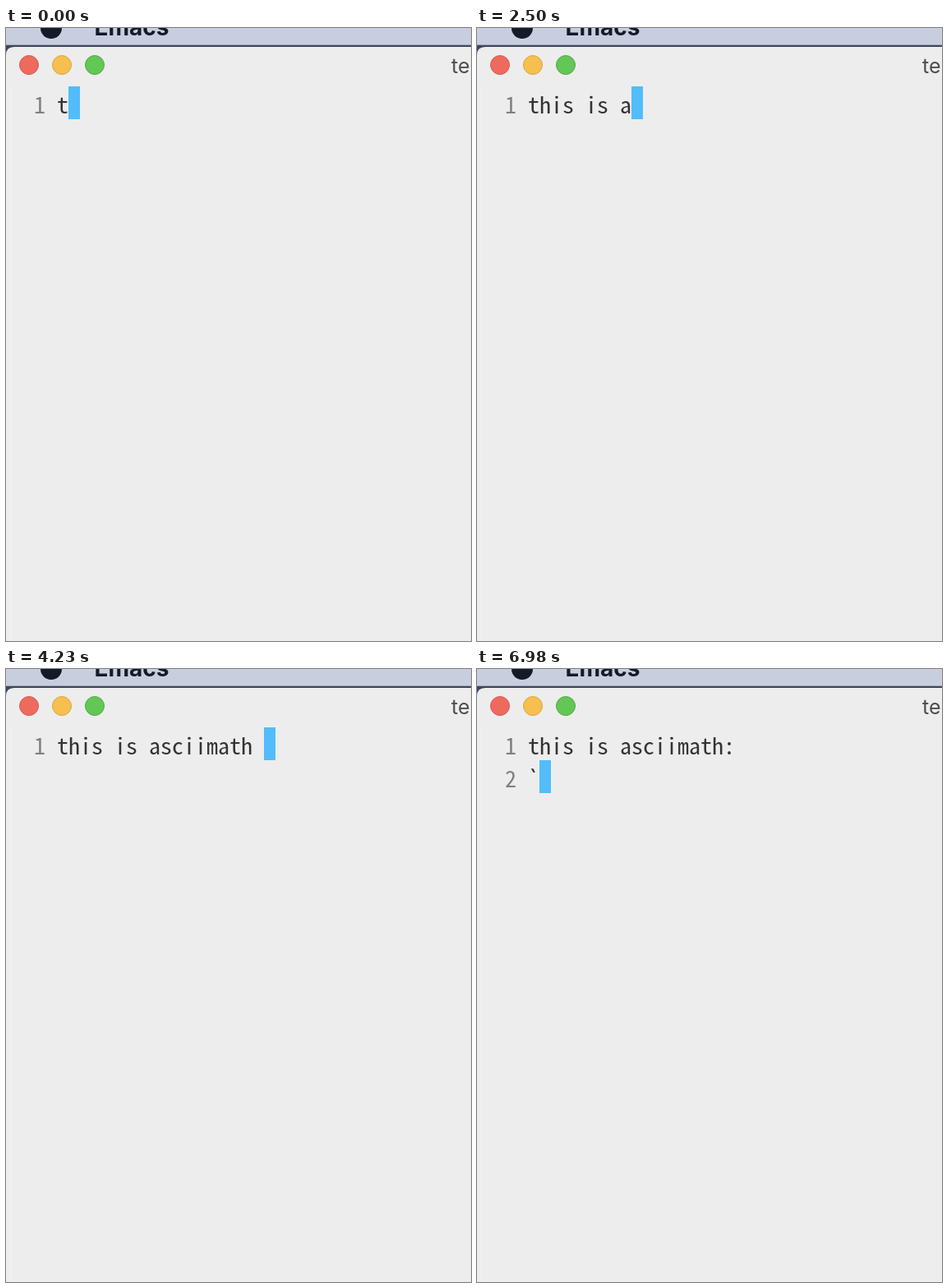
Animation, 566 px wide and 746 px high, one loop 8 s. Source, as an HTML page:

```html
<!DOCTYPE html>
<html lang="en">
<head>
<meta charset="utf-8">
<title>Typing in an editor</title>
<style>
  html, body { margin: 0; width: 100%; height: 100%; overflow: hidden; background: #ededed; }
  svg { display: block; width: 566px; height: 746px; }
  text { white-space: pre; }
  .ui { font-family: Inter, Roboto, sans-serif; }
  .code { font-family: "Noto Sans Mono CJK JP", "Noto Sans Mono CJK SC", "Noto Sans Mono", monospace; font-size: 28px; fill: #333; }
  .num { fill: #808080; }
</style>
</head>
<body>
<svg viewBox="0 0 566 746">
  <rect width="566" height="40" fill="#3d475c"/>
  <rect width="566" height="20.7" fill="#c8cedd"/>
  <circle cx="55" cy="0" r="13" fill="#141a28"/>
  <text class="ui" x="107.5" y="9" font-size="28" font-weight="700" fill="#141a28">Emacs</text>

  <path d="M0 746V33Q0 23 10 23H566V746Z" fill="#ededed"/>
  <path d="M5.5 70V746" stroke="#f3f3f3"/>
  <g stroke-width="1">
    <circle cx="28" cy="45" r="11.5" fill="#ee6a5f" stroke="#d45b50"/>
    <circle cx="68" cy="45" r="11.5" fill="#f6bf50" stroke="#d9a642"/>
    <circle cx="108" cy="45" r="11.5" fill="#62c755" stroke="#52a945"/>
  </g>
  <text class="ui" x="542" y="55" font-size="25" fill="#4d4d4d">te</text>

  <g id="editor" class="code">
    <rect id="cursor" width="14" height="40" fill="#53bcfb"/>
    <text class="num" x="34" y="103.5">1</text>
    <text class="num" x="34" y="143.5" id="num2">2</text>
    <text class="line" x="62" y="103.5">t</text>
    <text class="line" x="62" y="143.5"></text>
  </g>
</svg>
<script>
  const LOOP = 8000, CELL = 14, ROW = 40, LEFT = 62, TOP = 71;
  const $ = id => document.getElementById(id);
  const lines = document.querySelectorAll('.line');

  // Each burst: start, end, keys spread evenly between them ("<" deletes).
  const bursts = [
    [1000, 1220, 'his'], [1340, 1420, ' i'], [1570, 1770, 's a'],
    [2200, 2200, 's'], [2500, 2500, '<'], [2960, 3040, 'sc'],
    [3200, 3330, 'ii'], [3480, 3480, 'm'], [3880, 4230, 'ath '],
    [5480, 5480, '<'], [6390, 6390, ':'], [6710, 6710, '\n'], [6980, 6980, '`']
  ];
  const keys = bursts.flatMap(([start, end, text]) =>
    [...text].map((key, i) => [start + (end - start) * i / Math.max(1, text.length - 1), key]));

  function textAt(time) {
    let text = 't';
    for (const [at, key] of keys) {
      if (time < at) break;
      text = key === '<' ? text.slice(0, -1) : text + key;
    }
    return text;
  }

  // Choose the font size whose monospace advance is one cell.
  function fitFont() {
    const ctx = document.createElement('canvas').getContext('2d');
    ctx.font = '100px ' + getComputedStyle($('editor')).fontFamily;
    $('editor').style.fontSize = 100 * CELL / ctx.measureText('0').width + 'px';
  }

  let shown = null;
  function draw() {
    const text = textAt(performance.now() % LOOP);
    if (text !== shown) {
      shown = text;
      const rows = text.split('\n');
      const row = rows.length - 1;
      lines.forEach((line, i) => line.textContent = rows[i] || '');
      $('num2').style.visibility = rows[1] ? 'visible' : 'hidden';
      $('cursor').setAttribute('x', LEFT + rows[row].length * CELL);
      $('cursor').setAttribute('y', TOP + row * ROW);
    }
    requestAnimationFrame(draw);
  }

  fitFont();
  draw();
</script>
</body>
</html>
```
